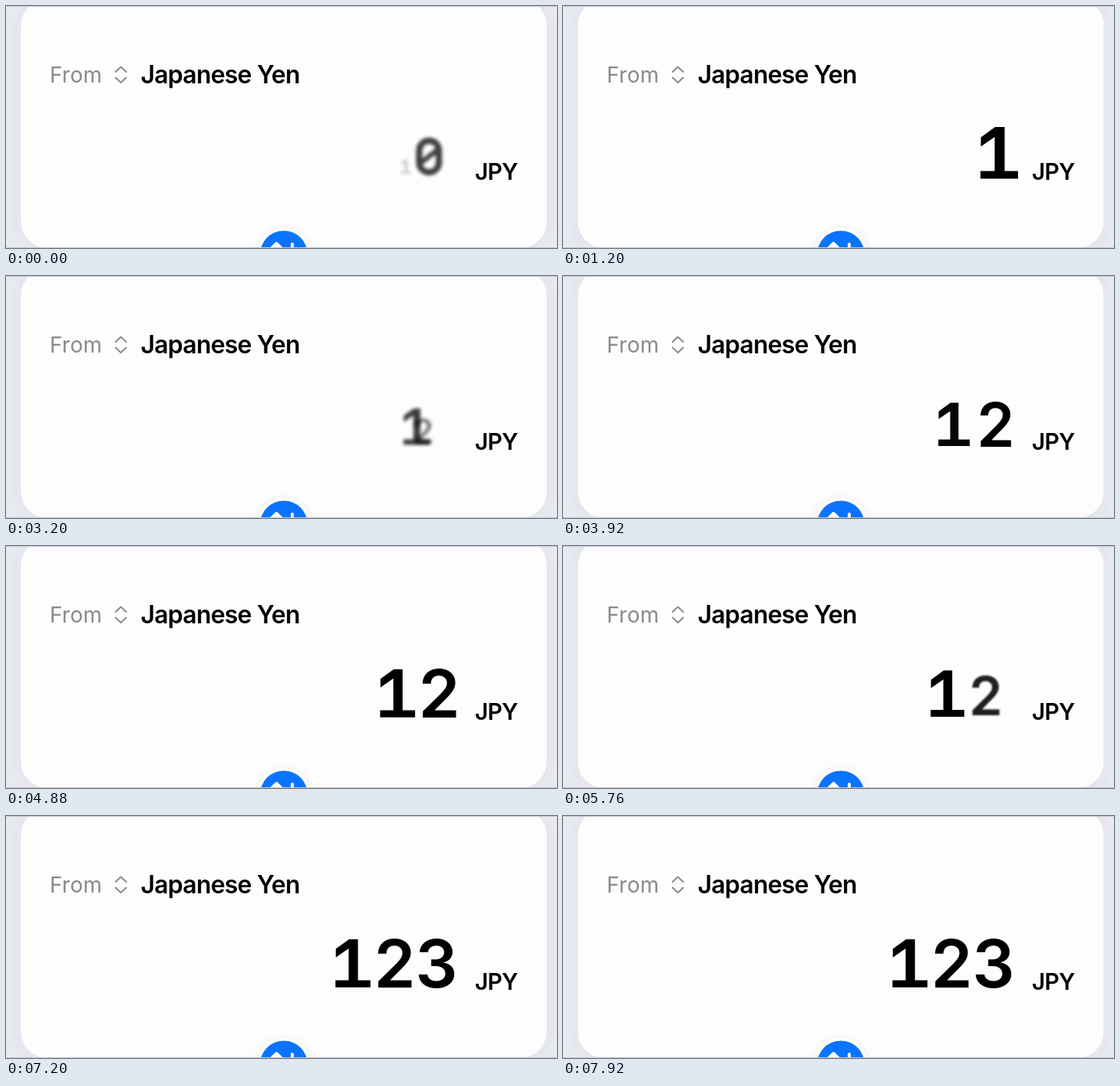
Write an HTML page that moves like this. It is 718x316 px and loops after 8000 ms.

```html
<!DOCTYPE html>
<html lang="en">
<head>
<meta charset="utf-8">
<title>Currency amount</title>
<style>
  html, body { margin: 0; width: 100%; height: 100%; overflow: hidden; background: #e9e9f0; }
  svg { display: block; width: 718px; height: 316px; }
  text { font-family: Inter, "Open Sans", sans-serif; font-weight: 600; }
  .label { font-weight: 400; fill: #89898c; }
  .digit { font-size: 93.5px; text-anchor: middle; }
  .icon { fill: none; stroke-linecap: round; stroke-linejoin: round; }
</style>
</head>
<body>
<svg viewBox="0 0 718 316">
  <defs>
    <filter id="cardShadow" x="-10%" y="-10%" width="120%" height="120%">
      <feDropShadow dx="0" dy="2" stdDeviation="8" flood-color="#60607c" flood-opacity=".07"/>
    </filter>
    <filter id="knobShadow" x="-30%" y="-30%" width="160%" height="160%">
      <feDropShadow dx="0" dy="1" stdDeviation="4" flood-opacity=".1"/>
    </filter>
  </defs>
  <rect width="718" height="316" fill="#e9e9f0"/>
  <rect x="19.5" y="-9" width="685" height="325" rx="34" fill="#fdfdfd" filter="url(#cardShadow)"/>

  <text class="label" x="57" y="99.5" font-size="28" letter-spacing=".3">From</text>
  <path class="icon" stroke="#8b8b8f" stroke-width="2.1" d="M142.8 86l6.9-6.5 6.9 6.5M142.8 93.6l6.9 6.5 6.9-6.5"/>
  <text x="175.5" y="101" font-size="32" letter-spacing="-.8">Japanese Yen</text>
  <text x="611" y="226.5" font-size="30" letter-spacing="-.9">JPY</text>

  <g id="digits">
    <g aria-label="0" fill="none" stroke="#000" stroke-width="11.5">
      <rect x="-18" y="-29" width="36" height="58" rx="18"/>
      <path d="M-14 11L14-11" stroke-width="9"/>
    </g>
    <path aria-label="1" d="M-5.5-34H7V23.5H24.5V33.5H-24.5V23.5H-6V-21L-24-8.5V-20.5Z"/>
    <text class="digit" y="34">2</text>
    <text class="digit" y="34">3</text>
  </g>

  <circle cx="362" cy="324.5" r="35" fill="#fdfdfd" filter="url(#knobShadow)"/>
  <circle cx="362" cy="324.5" r="31" fill="#0a74ff"/>
  <path class="icon" stroke="#fff" stroke-width="4" d="M345.5 317l7-7 7 7M352.5 310v26M373 311v26M366 330l7 7 7-7"/>
  <path stroke="#c6c6ca" d="M0 .5H718M0 315.5H718"/>
</svg>
<script>
const LOOP = 8000, FIRST = -500, GAP = 2930, DURATION = 1700;
const MID_Y = 192, PITCH = 58.5;

const [zero, ...digits] = document.getElementById("digits").children;

const clamp = v => Math.max(0, Math.min(1, v));
const mix = (a, b, p) => a + (b - a) * p;
const smooth = u => u * u * (3 - 2 * u);

// A number of n digits: its scale and where digit i rests
const fit = n => n > 1 ? .93 : 1;
const slot = (i, n) => 568.5 - 31 * (n - 1) + PITCH * fit(n) * (i - (n - 1) / 2);

// size is 1 at rest; smaller digits are fainter, softer and sit lower
function place(el, x, size, base) {
  const s = size * base;
  const opacity = clamp(1.25 * size - .14);
  el.style.opacity = opacity;
  if (!opacity) return;
  const y = MID_Y + 29 * Math.pow(1 - s, 1.5);
  const blur = Math.min(2, 7 * (1 - size));
  el.setAttribute("transform", `translate(${x} ${y}) scale(${s})`);
  el.style.filter = blur > .05 ? `blur(${blur / s}px)` : "none";
}

function draw(t) {
  const press = Math.floor((t - FIRST) / GAP);
  const u = clamp((t - FIRST - press * GAP) / DURATION);
  const p = smooth(u);

  const left = press ? 0 : clamp(1 - (u / .55) ** 2);
  place(zero, slot(0, 1) - 60 * (1 - left), left, 1);

  digits.forEach((el, i) => {
    const age = press - i;
    if (age < 0) {
      place(el, 0, 0, 1);
    } else if (age === 0) {
      const size = clamp((u - .22) / .78) ** .55;
      place(el, slot(i, press + 1) - 90 * (1 - size) ** 2, size, fit(press + 1));
    } else {
      // The newest standing digit dips most
      const dip = .28 * Math.sin(Math.PI * u) * .2 ** (age - 1);
      const x = mix(slot(i, press), slot(i, press + 1), p) - 30 * dip;
      place(el, x, 1 - dip, mix(fit(press), fit(press + 1), p));
    }
  });
}

const start = performance.now();
function tick() {
  draw((performance.now() - start) % LOOP);
  requestAnimationFrame(tick);
}
tick();
</script>
</body>
</html>
```
